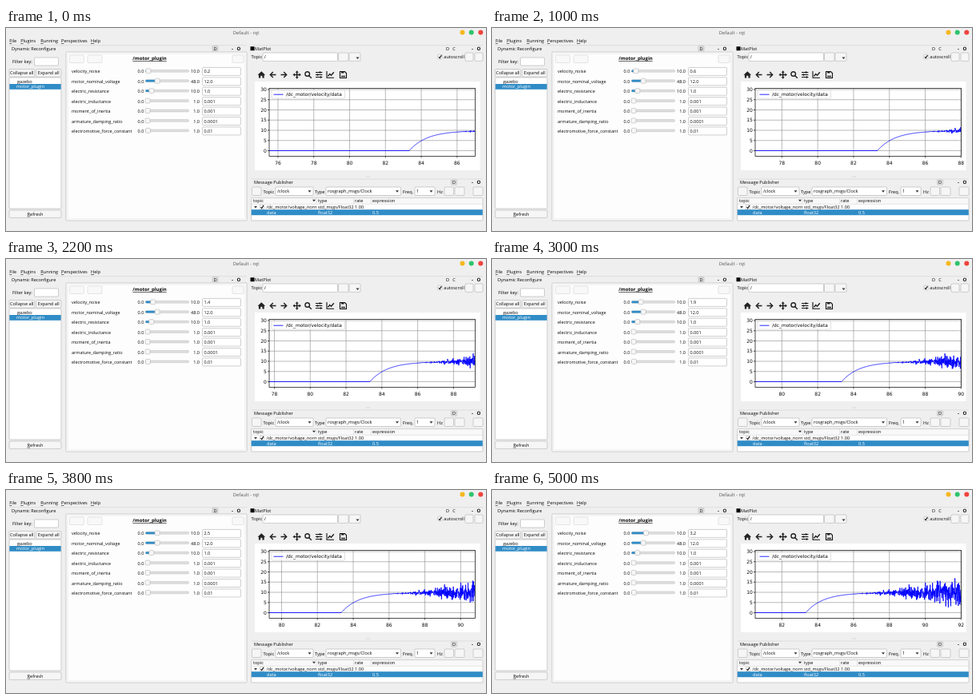
An HTML page for the animation above (5.1 s loop, 600x254 px).

```html
<!DOCTYPE html>
<html lang="en">
<head>
<meta charset="utf-8">
<title>Default - rqt</title>
<style>
  html, body { margin: 0; width: 100%; height: 100%; overflow: hidden; background: #efefef; }
  svg { display: block; width: 600px; height: 254px; }
  text { font: 5.6px "Open Sans", "Noto Sans", sans-serif; fill: #080808; text-rendering: geometricPrecision; white-space: pre; }
  .plot text { font: 6px "DejaVu Sans", sans-serif; }
  .plot .legend { font-size: 5.9px; }
  .u { text-decoration: underline; }
  .title { font-size: 5.8px; fill: #555; }
  .param { font-size: 5.5px; }
  .bold { font-size: 6px; font-weight: 700; }
  .white { fill: #fff; }
  .field { fill: #fff; stroke: #b0b0b0; stroke-width: .6; }
  .btn { fill: #f6f6f6; stroke: #b4b4b4; stroke-width: .6; }
  .faint { fill: #f8f8f8; stroke: #d6d6d6; stroke-width: .6; }
  .badge { fill: #e0e0e0; stroke: #b8b8b8; stroke-width: .6; }
  .panel { fill: #fdfdfd; stroke: #e0e0e0; stroke-width: .6; }
  .sel { fill: #308cc6; }
  .groove { fill: #dedede; stroke: #b4b4b4; stroke-width: .4; }
  .line { fill: none; stroke: #222; stroke-width: .8; }
  .mark { fill: none; stroke: #111; stroke-width: 1.1; }
  .icon { fill: none; stroke: #222; stroke-width: 1.4; }
  .grid { fill: none; stroke: #8c8c8c; stroke-width: .6; }
  .curve { fill: none; stroke: #00f; stroke-width: .85; stroke-linejoin: round; }
</style>
</head>
<body>
<svg viewBox="0 0 600 254">
  <defs>
    <clipPath id="axes"><rect x="329" y="75.5" width="257.5" height="85"/></clipPath>
    <clipPath id="topicCol"><rect x="307" y="219" width="81" height="10"/></clipPath>
  </defs>
  <g id="ui"></g>
  <g class="plot">
    <rect x="311" y="67" width="281.5" height="111" fill="#fff"/>
    <path id="grid" class="grid"/>
    <path id="ticks" class="line"/>
    <path id="curve" class="curve" clip-path="url(#axes)"/>
    <rect x="329" y="75.5" width="257.5" height="85" class="line"/>
    <rect x="332" y="77.7" width="91.5" height="10.4" rx="1" fill="#fff" fill-opacity=".85" stroke="#ccc" stroke-width=".6"/>
    <path d="M334.5 83.2h12" class="curve"/>
    <text class="legend" x="350" y="85.2">/dc_motor/velocity/data</text>
    <g id="yLabels" text-anchor="end"></g>
    <g id="xLabels" text-anchor="middle"></g>
  </g>
</svg>
<script>
const $ = id => document.getElementById(id);
const rect = (cls, x, y, w, h, r = 1, id = '') =>
  `<rect id="${id}" class="${cls}" x="${x}" y="${y}" width="${w}" height="${h}" rx="${r}"/>`;
const path = (d, cls = 'line', extra = '') => `<path class="${cls}" d="${d}" ${extra}/>`;
// y is the vertical middle of the capitals
const text = (x, y, s, cls = '', anchor = 'start', id = '') =>
  `<text x="${x}" y="${y + 2}" class="${cls}" text-anchor="${anchor}" id="${id}">${s}</text>`;
const mnemonic = s => `<tspan class="u">${s[0]}</tspan>${s.slice(1)}`;
const arrow = (x, y) => path(`M${x} ${y - 1}h4l-2 2.4z`, '', 'fill="#333"');
const button = (x, y, w, h, label = '') =>
  rect('btn', x, y, w, h) + text(x + w / 2, y + h / 2, label, '', 'middle');
const combo = (x, y, w, h, label) =>
  rect('field', x, y, w, h) + text(x + 2, y + h / 2, label) + arrow(x + w - 6.5, y + h / 2);
const check = (x, y) =>
  rect('field', x - 2.7, y - 2.7, 5.4, 5.4, .5) + path(`M${x - 1.6} ${y}l1.3 1.5l2.2 -3.4`, 'mark');
const dock = (x, y, w, label, badges, end) =>
  path(`M${x} ${y - 4}h${w}`, '', 'stroke="#d2d2d2" stroke-width=".6"') + text(x + 3, y, label) +
  badges.map(bx => rect('badge', bx - 3.5, y - 3.2, 7, 6.4) + text(bx, y, 'D', '', 'middle')).join('') +
  text(end - 8, y, '-', 'bold', 'middle') + text(end, y, 'O', 'bold', 'middle');

const sliderX = f => 177 + f * 48.5;

const params = [
  ['velocity_noise', 10, 0.2], ['motor_nominal_voltage', 48, 12], ['electric_resistance', 10, 1],
  ['electric_inductance', 1, 0.001], ['moment_of_inertia', 1, 0.001],
  ['armature_damping_ratio', 1, 0.0001], ['electromotive_force_constant', 1, 0.01]
];
const show = v => Number.isInteger(v) ? v.toFixed(1) : String(v);

function paramRow([name, max, value], i) {
  const y = 54.4 + i * 12.42, x = sliderX(value / max);
  const id = s => i === 0 ? s : '';
  return text(82, y, name, 'param') + text(172.3, y, '0.0', 'param', 'end') +
    text(242, y, max.toFixed(1), 'param', 'end') +
    rect('groove', 174.5, y - 2, 54, 2.8) +
    rect('sel', 174.5, y - 2, x - 174.5, 2.8, 1, id('fill')) +
    rect('btn', x - 3, y - 3.6, 6, 6, 1.4, id('knob')) +
    rect('field', 245.5, y - 5, 48, 10) + text(247.5, y, show(value), 'param', 'start', id('value'));
}

function windowFrame() {
  const dots = [[570.5, '#f5b81e'], [581.7, '#2ec46c'], [593.3, '#f0443e']];
  const menu = [[4.3, 'File'], [18.3, 'Plugins'], [43.3, 'Running'], [69, 'Perspectives'], [106, 'Help']];
  return '<rect width="600" height="254" fill="#efefef"/>' +
    text(300, 5.7, 'Default - rqt', 'title', 'middle') +
    dots.map(([x, c]) => `<circle cx="${x}" cy="5.4" r="3" fill="${c}"/>`).join('') +
    menu.map(([x, s]) => text(x, 16.2, mnemonic(s))).join('');
}

function reconfigure() {
  return dock(4, 25.7, 297, 'Dynamic Reconfigure', [261.5], 291) +
    text(8, 42, 'Filter key:') + rect('field', 35.5, 37, 30, 10) +
    button(4, 51.5, 31.5, 9.5, 'Collapse all') + button(37.5, 51.5, 31.5, 9.5, 'Expand all') +
    rect('field', 4, 62, 65, 164) + text(14, 66.8, 'gazebo') +
    rect('sel', 4.3, 70, 64.4, 6.8, 0) + text(13, 73.2, 'motor_plugin', 'white') +
    button(4, 228, 65, 9.4, mnemonic('Refresh')) +
    rect('field', 75, 30, 226, 211) + rect('panel', 77, 32, 222, 207) +
    rect('faint', 79.5, 34, 18, 9.5) + rect('faint', 102, 34, 18, 9.5) + rect('faint', 283, 34, 14, 9.5) +
    text(179.5, 38, '/motor_plugin', 'bold u', 'middle') + params.map(paramRow).join('');
}

function toolbar() {
  const fill = 'fill="#222"';
  return path('M314.5 58.7l4.8-4.5l4.8 4.5h-1.4v3.7h-2.3v-2.7h-2.2v2.7h-2.3v-3.7z', '', fill) +
    path('M337.5 58.5h-7M333.8 55l-3.5 3.5l3.5 3.5', 'icon') +
    path('M343.5 58.5h7M347.2 55l3.5 3.5l-3.5 3.5', 'icon') +
    path('M360 58.5h7.4M363.7 54.8v7.4', 'icon') +
    path('M363.7 53.3l2 2.4h-4zM363.7 63.7l2-2.4h-4zM358.5 58.5l2.4 2v-4zM368.9 58.5l-2.4 2v-4z', '', fill) +
    '<circle class="icon" cx="376.7" cy="57.5" r="2.8"/>' + path('M378.8 59.7l3 3', 'icon') +
    path('M387 55.5h8.4M387 58.5h8.4M387 61.5h8.4', 'mark') +
    path('M392.5 54.3v2.4M389.5 57.3v2.4M393.5 60.3v2.4', 'icon') +
    path('M401 54v8.3h9', 'mark') + path('M402.5 60.2l2.2-2.6l1.8 1.6l3.3-4', 'icon') +
    path('M417.5 54.5h6l2 2v6h-8z', 'mark') + path('M419 55.8h3.5M419 60.5h5', 'icon');
}

function matPlot() {
  return dock(308, 25.7, 288, 'MatPlot', [], 591) + rect('', 305.5, 23.2, 5, 5, 0) +
    text(552, 25.7, 'D', '', 'middle') + text(560, 25.7, 'C', '', 'middle') +
    text(306.5, 36, 'Topic') + rect('field', 321, 31, 93.5, 10.4) + text(322.8, 36, '/') +
    button(415.5, 31, 12.5, 10.4) + button(429, 31, 14, 10.4) + arrow(437.5, 37.5) +
    check(542.5, 36) + text(547.3, 36, 'autoscroll') + button(574, 31, 10, 10.4) + button(586, 31, 10, 10.4) +
    toolbar() + path('M450 186h5', '', 'stroke="#bbb" stroke-width=".8" stroke-dasharray="1 1"');
}

function publisher() {
  const heads = [[309, 'topic'], [390, 'type'], [436, 'rate'], [458, 'expression']];
  return dock(307, 193, 289, 'Message Publisher', [560], 591) +
    button(307.5, 199, 11.5, 10.5) + text(321.5, 204.5, 'Topic') + combo(337, 199, 47, 10.5, '/clock') +
    text(386, 204.5, 'Type') + combo(400, 199, 93.5, 10.5, 'rosgraph_msgs/Clock') +
    text(496, 204.5, 'Freq.') + combo(511, 199, 25, 10.5, '1') + text(539, 204.5, 'Hz') +
    button(548, 199, 11.5, 10.5) + button(561, 199, 12, 10.5) + button(584, 199, 12, 10.5) +
    rect('field', 306.5, 212.5, 289.5, 28.5) + rect('faint', 306.8, 212.8, 289, 7.4, 0) +
    heads.map(([x, s]) => text(x, 216, s)).join('') + arrow(383, 215.8) +
    [388, 434.5, 456.5].map(x => path(`M${x} 213v7`, '', 'stroke="#ccc" stroke-width=".5"')).join('') +
    arrow(310, 224) + check(320, 224) +
    `<g clip-path="url(#topicCol)">${text(325.5, 224, '/dc_motor/voltage_norm')}</g>` +
    text(390, 224, 'std_msgs/Float32', 'param') + text(436, 224, '1.00') +
    rect('sel', 306.8, 227.2, 289, 7, 0) +
    [[326, 'data'], [390, 'float32'], [458, '0.5']].map(([x, s]) => text(x, 230.8, s, 'white')).join('');
}

const LEFT = 329, RIGHT = 586.5, SPAN = 11.5, START = 83.33, RATE = 100;
const scaleX = (RIGHT - LEFT) / SPAN;
const plotY = v => 153.5 - v * 2.55;

// Noise level set by the slider, s in seconds since the loop began
const noise = s => s < 0 ? Math.max(0, .2 + .15 * s) : s < 1 ? .2 + .42 * s : .62 + .655 * (s - 1);
const random = n => { const v = Math.sin(n * 12.9898) * 43758.5453; return v - Math.floor(v); };
const gauss = i => Math.sqrt(-2 * Math.log(random(i) + 1e-4)) * Math.cos(2 * Math.PI * random(i + .37));
const speed = (x, i) => 9.8 * (1 - Math.exp((START - x) / .98)) + noise(x - 87) * gauss(i);

function drawPlot(s) {
  const end = 87.01 + s, start = end - SPAN;
  const px = x => LEFT + (x - start) * scaleX;
  let grid = '', ticks = '', labels = '';
  for (let v = 0; v <= 30; v += 5) {
    grid += `M${LEFT} ${plotY(v)}H${RIGHT}`;
    ticks += `M${LEFT} ${plotY(v)}h-2`;
  }
  for (let v = Math.ceil(start / 2) * 2; v <= end; v += 2) {
    const x = px(v).toFixed(2);
    grid += `M${x} 75.5V160.5`;
    ticks += `M${x} 160.5v2`;
    labels += `<text x="${x}" y="170.8">${v}</text>`;
  }
  let d = `M${LEFT} ${plotY(0)}H${px(START).toFixed(2)}`;
  for (let i = Math.ceil(START * RATE); i <= end * RATE; i++)
    d += `L${px(i / RATE).toFixed(2)} ${plotY(speed(i / RATE, i)).toFixed(2)}`;
  $('grid').setAttribute('d', grid);
  $('ticks').setAttribute('d', ticks);
  $('curve').setAttribute('d', d);
  $('xLabels').innerHTML = labels;
}

function drawSlider(s) {
  const level = noise(s).toFixed(1), x = sliderX(level / 10);
  $('knob').setAttribute('x', x - 3);
  $('fill').setAttribute('width', x - 174.5);
  $('value').textContent = level;
}

$('ui').innerHTML = windowFrame() + reconfigure() + matPlot() + publisher();
$('yLabels').innerHTML = [0, 5, 10, 15, 20, 25, 30]
  .map(v => `<text x="325.8" y="${plotY(v) + 2.2}">${v}</text>`).join('');

let last = -1;
function tick() {
  const step = Math.floor(performance.now() % 5100 / 100);
  if (step !== last) {
    last = step;
    drawPlot(step / 10);
    drawSlider(step / 10);
  }
  requestAnimationFrame(tick);
}
tick();
</script>
</body>
</html>
```
